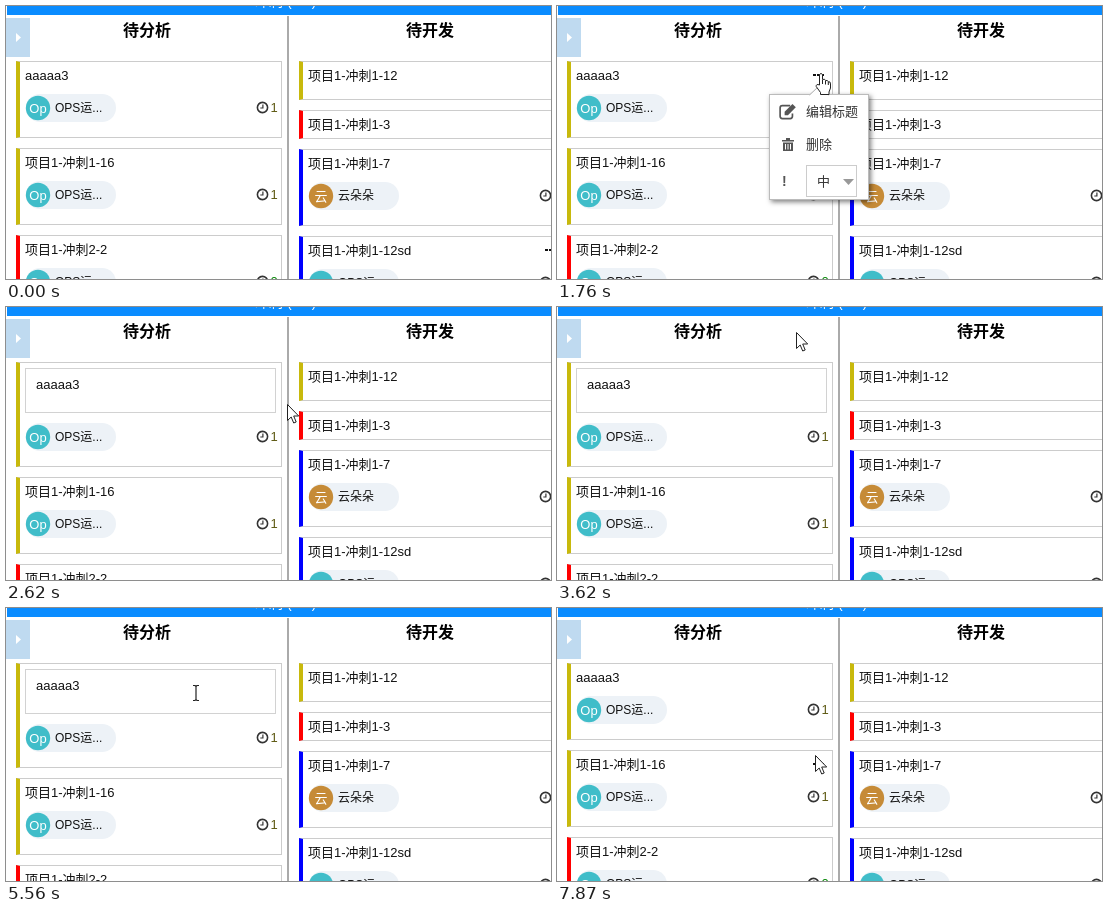
Animation, 545 px wide and 273 px high, one loop 8 s. Source, as an HTML page:

```html
<!DOCTYPE html>
<html lang="zh">
<head>
<meta charset="utf-8">
<style>
  html, body { margin: 0; width: 100%; height: 100%; overflow: hidden; background: #fff; }
  svg { display: block; width: 100%; height: 100%; }
  text { font-family: "Liberation Sans", "Noto Sans CJK SC", "Noto Sans CJK", sans-serif; white-space: pre; }
  rect { shape-rendering: crispEdges; }
  rect[rx] { shape-rendering: auto; }
  .middle { text-anchor: middle; }
  .bold { font-weight: bold; }
  .shadow { filter: drop-shadow(2px 2px 2.5px rgba(0, 0, 0, .5)); }
</style>
</head>
<body>
<svg id="stage" viewBox="0 0 545 273" preserveAspectRatio="none"></svg>
<script>
const LOOP = 8000, ON_DOTS = 1490, MENU_OPEN = 1760, EDIT_OPEN = 2620, EDIT_CLOSE = 6440;
const CARD_WIDTH = 266, EDIT_GROW = 28;
const OLIVE = '#c8b90c', RED = '#f00', BLUE = '#00f', INK = '#111';
const stage = document.getElementById('stage');

// The pointer glides along one curve per leg, in a few visible jumps.
const start = [552, 243];
const legs = [
  { from: 120, until: 1060, jumps: 8, bend: [175, 72], to: [254, 66] },
  { from: 1210, until: ON_DOTS, jumps: 2, bend: [256, 69], to: [263, 67] },
  { from: 2040, until: 2190, jumps: 2, bend: [272, 82], to: [281, 97] },
  { from: 3050, until: 3620, jumps: 5, bend: [172, 50], to: [239, 25] },
  { from: 3930, until: 4530, jumps: 5, bend: [212, 80], to: [226, 35] },
  { from: 4800, until: 5560, jumps: 6, bend: [185, 196], to: [190, 85] },
  { from: 5710, until: EDIT_CLOSE, jumps: 6, bend: [200, 60], to: [230, 22] },
  { from: 6690, until: 7870, jumps: 9, bend: [254, 60], to: [258, 147] }
];

function pointerAt(t) {
  let pos = start;
  for (const { from, until, jumps, bend, to } of legs) {
    if (t < from) break;
    const passed = Math.floor((t - from) / (until - from) * (jumps - 1) + 1e-6) + 1;
    const u = Math.min(1, passed / jumps), v = 1 - u;
    pos = pos.map((p, i) => v * v * p + 2 * u * v * bend[i] + u * u * to[i]);
  }
  return pos.map(Math.round);
}

const ops = { name: 'OPS运...', mark: 'Op', color: '#40bdc9' };
const cloud = { name: '云朵朵', mark: '云', color: '#c68b37' };
const columns = [
  { x: 10, name: '待分析', cards: [
    { color: OLIVE, title: 'aaaaa3', user: ops, count: 1, editable: true },
    { color: OLIVE, title: '项目1-冲刺1-16', user: ops, count: 1 },
    { color: RED, title: '项目1-冲刺2-2', user: ops, count: 0 }
  ] },
  { x: 293, name: '待开发', cards: [
    { color: OLIVE, title: '项目1-冲刺1-12', height: 39 },
    { color: RED, title: '项目1-冲刺1-3' },
    { color: BLUE, title: '项目1-冲刺1-7', user: cloud, count: 1 },
    { color: BLUE, title: '项目1-冲刺1-12sd', user: ops, count: 1 }
  ] }
];

const rect = (x, y, w, h, fill, more = '') =>
  `<rect x="${x}" y="${y}" width="${w}" height="${h}" fill="${fill}" ${more}/>`;
const box = (x, y, w, h, line, more) => rect(x, y, w, h, line, more) + rect(x + 1, y + 1, w - 2, h - 2, '#fff');
const text = (x, y, s, size = 13, fill = INK, style = '') =>
  `<text x="${x}" y="${y}" font-size="${size}" fill="${fill}" class="${style}">${s}</text>`;
const path = (d, fill) => `<path d="${d}" fill="${fill}"/>`;
const line = (d, stroke, width = 1, fill = 'none') =>
  `<path d="${d}" fill="${fill}" stroke="${stroke}" stroke-width="${width}"/>`;
const circle = (x, y, r, more) => `<circle cx="${x}" cy="${y}" r="${r}" ${more}/>`;
const at = (x, y, s, scale = 1) => `<g transform="translate(${x} ${y}) scale(${scale})">${s}</g>`;
const inside = ([px, py], x, y, w, h) => px >= x && px < x + w && py >= y && py < y + h;

const clock = (x, y) =>
  circle(x, y, 5.1, 'fill="none" stroke="#333" stroke-width="1.6"') + line(`M${x + .4} ${y - 3}v3.5h-2.6`, '#333', 1.2);
const dots = (x, y) => [0, 4, 8].map(d => rect(x + d, y, 3, 2, INK)).join('');

function person(x, y, user) {
  return rect(x, y, 90, 28, '#edf2f7', 'rx="14"') +
    circle(x + 12, y + 14, 12.2, `fill="${user.color}"`) +
    text(x + 12, y + 18.5, user.mark, 13, '#fff', 'middle') +
    text(x + 29, y + 18, user.name, 12);
}

function drawCard(card, x, y, h, editing, hovered) {
  const low = y + (editing ? EDIT_GROW : 0);
  let s = box(x, y, CARD_WIDTH, h, '#ccc') + path(`M${x} ${y}l4 1v${h - 2}l-4 1z`, card.color);
  s += editing
    ? box(x + 9, y + 6, 251, 45, '#d2d2d2') + text(x + 20, y + 27, card.title)
    : text(x + 9, y + 19, card.title);
  if (card.user) {
    s += person(x + 10, low + 33, card.user) + clock(x + 246.5, low + 46.5) +
      text(x + 254.5, low + 51, card.count, 13, card.count ? '#5e5a14' : '#0a8a0a');
  }
  return s + (hovered ? dots(x + 246, y + 13) : '');
}

function drawColumn({ x, name, cards }, pointer, editing, covered) {
  let y = 55, s = text(x + 131, 29.5, name, 16, '#000', 'middle bold');
  for (const card of cards) {
    const edited = editing && card.editable;
    const h = (card.height || (card.user ? 77 : 29)) + (edited ? EDIT_GROW : 0);
    const hovered = !editing && !covered && inside(pointer, x, y, CARD_WIDTH, h);
    s += drawCard(card, x, y, h, edited, hovered);
    y += h + 10;
  }
  return s;
}

function drawMenu(active) {
  const ink = active ? '#eef5fc' : '#555';
  const editIcon = line('M10 1.5H3Q1 1.5 1 3.5V11Q1 13 3 13H10Q12 13 12 11V8.5', ink, 1.5) + path('M5 10V7L12 0L15 3L8 10Z', ink);
  const trashIcon = path('M0 2H4V0H8V2H12V3.5H0ZM1 4.500H11V13H1Z', '#555') + line('M3.5 6V11.5M6 6V11.5M8.5 6V11.5', '#fff');
  return box(212, 88, 100, 106, '#bbb', 'class="shadow"') +
    line('M252.5 89L262 80L271.5 89', '#aaa', 1, '#fff') +
    (active ? rect(213, 89, 98, 33, '#7db1e2') : '') +
    at(222, 98, editIcon, 1.12) + text(249, 110, '编辑标题', 13, active ? ink : '#333', active ? 'bold' : '') +
    at(225, 132, trashIcon) + text(249, 143, '删除', 13, '#333') +
    text(225, 180, '!', 14, '#555', 'bold') +
    box(249, 159, 51, 32, '#ccc') + text(260, 180, '中', 13, '#333') + path('M286 173h11l-5.5 6z', '#999');
}

const cursors = {
  arrow: line('M.5 .5V16.5L4.2 13L6.7 19L9.2 18L6.7 12H11.7Z', '#222', 1, '#fff'),
  hand: at(1, 0, line('M-1.5 12V1.5Q0 -.7 1.5 1.5V6.500Q4 5.500 4.500 7.500Q7 7 7.300 8.800Q9.500 8 9.500 11V15L8 19V21.500H-.5V19.500L-4.800 13.500Q-5 10.500 -1.500 12', '#222', 1, '#fff') +
    line('M1.5 7V11M4.500 8V11.5M7.300 9V12', '#222')),
  beam: line('M-3 -7.5H-1L0 -6.5L1 -7.5H3M0 -6.5V6.5M-3 7.5H-1L0 6.5L1 7.5H3', '#222', 1.2)
};

function scene(t) {
  const pointer = pointerAt(t);
  const menuOpen = t >= MENU_OPEN && t < EDIT_OPEN;
  const editing = t >= EDIT_OPEN && t < EDIT_CLOSE;
  const overMenu = menuOpen && pointer[1] >= 80;
  const overField = editing && inside(pointer, 19, 61, 251, 45);
  const cursor = t >= ON_DOTS && t < EDIT_OPEN ? 'hand' : overField ? 'beam' : 'arrow';

  return rect(0, 0, 545, 273, '#fff') + rect(281, 10, 2, 263, '#aaa') +
    rect(1, 0, 544, 9, '#0a8cff') + text(249, 0, '冲刺 (1-1)', 14, '#fff') +
    rect(0, 12, 24, 39, '#bfdaf0') + path('M10 27l5 4.5l-5 4.5z', '#fff') +
    columns.map(c => drawColumn(c, pointer, editing, overMenu)).join('') +
    (menuOpen ? drawMenu(overMenu) : '') + at(...pointer, cursors[cursor]);
}

let shown = '';
function draw() {
  const next = scene(performance.now() % LOOP);
  if (next !== shown) stage.innerHTML = shown = next;
  requestAnimationFrame(draw);
}
draw();
</script>
</body>
</html>
```
